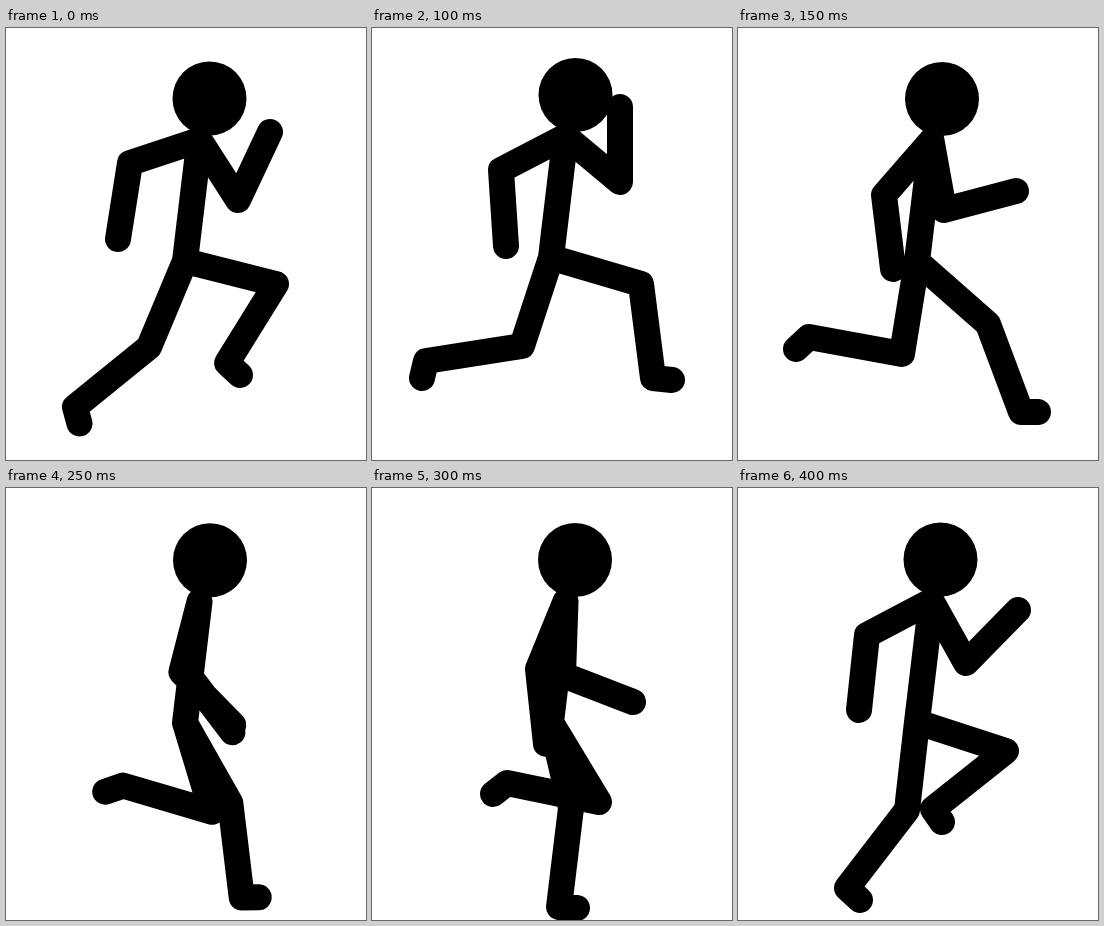
Recreate the animation shown at these times as an HTML page. Size 360x432 px, loop 0.45 s.

```html
<!DOCTYPE html>
<html lang="en">
<head>
<meta charset="utf-8">
<title>Running stick figure</title>
<style>
  html, body { margin: 0; width: 100%; height: 100%; overflow: hidden; background: #fff; }
  svg { display: block; width: 360px; height: 432px; }
  path { fill: none; stroke: #000; stroke-width: 26; stroke-linecap: round; stroke-linejoin: round; }
</style>
</head>
<body>
<svg viewBox="0 0 360 432">
  <circle id="head" r="37"/>
  <path id="body"/>
</svg>
<script>
const STEP = 50, COUNT = 9;

// Key poses by step: head centre, two arms (elbow, hand), two legs (knee, ankle, toe).
const keys = {
  0: { head: [203.5, 70.5],
    arms: [[124, 135, 112, 211], [232, 172, 264, 104]],
    legs: [[270, 256, 221, 335, 234, 347], [143, 319, 69, 379, 73.5, 395.5]] },
  2: { head: [203.5, 67],
    arms: [[129, 142, 134, 218], [248, 154, 248, 79]],
    legs: [[269, 256, 281, 350, 300, 352], [150, 318, 54, 333, 50, 350]] },
  3: { head: [204, 71],
    arms: [[146, 167, 155, 241], [206, 182, 278, 163]],
    legs: [[250, 296, 283, 384, 300, 384], [164, 326, 71, 309, 58, 321]] },
  4: { head: [205, 72.5],
    arms: [[173, 183, 180, 255], [185, 186, 257, 195]],
    legs: [[248, 302, 280, 387, 296, 386], [183, 328, 98, 295, 78, 295]] },
  6: { head: [203, 72],
    arms: [[191, 187, 261, 214], [166, 181, 174, 256]],
    legs: [[199, 320, 187, 419, 205, 420], [227, 314, 135, 295, 121, 306]] },
  8: { head: [202.5, 71.5],
    arms: [[228, 175, 280, 122], [129, 147, 121, 222]],
    legs: [[169, 322, 109, 400, 122, 412], [268, 263, 195, 321, 204, 334]] }
};

const mean = (a, b) => (a + b) / 2;
const shoulder = head => [193.5, head[1] + 41.5];
const hip = head => [179, head[1] + 162.5];

function toBones(root, limb) {
  let [x, y] = root;
  const bones = [];
  for (let i = 0; i < limb.length; i += 2) {
    const dx = limb[i] - x, dy = limb[i + 1] - y;
    bones.push({ angle: Math.atan2(dy, dx), length: Math.hypot(dx, dy) });
    x = limb[i];
    y = limb[i + 1];
  }
  return bones;
}

// Swings each bone halfway along the shorter arc.
function midLimb(rootA, limbA, rootB, limbB, root) {
  let [x, y] = root;
  const end = toBones(rootB, limbB);
  return toBones(rootA, limbA).flatMap((bone, i) => {
    const turn = end[i].angle - bone.angle;
    const angle = bone.angle + Math.atan2(Math.sin(turn), Math.cos(turn)) / 2;
    const length = mean(bone.length, end[i].length);
    x += length * Math.cos(angle);
    y += length * Math.sin(angle);
    return [x, y];
  });
}

function midPose(a, b) {
  const head = a.head.map((v, i) => mean(v, b.head[i]));
  const blend = (part, root) => a[part].map((limb, i) =>
    midLimb(root(a.head), limb, root(b.head), b[part][i], root(head)));
  return { head, arms: blend("arms", shoulder), legs: blend("legs", hip) };
}

const poses = Array.from({ length: COUNT }, (_, i) =>
  keys[i] || midPose(keys[i - 1], keys[i + 1]));

function outline({ head, arms, legs }) {
  const top = shoulder(head), base = hip(head);
  const line = (root, points) => "M" + [...root, ...points].map(v => v.toFixed(1)).join(" ");
  return line(top, base) +
    arms.map(limb => line(top, limb)).join("") +
    legs.map(limb => line(base, limb)).join("");
}

const headShape = document.getElementById("head");
const bodyShape = document.getElementById("body");
const start = performance.now();
let shown = -1;

function draw(now) {
  const step = Math.floor(Math.max(0, now - start) / STEP) % COUNT;
  if (step !== shown) {
    const pose = poses[step];
    headShape.setAttribute("cx", pose.head[0]);
    headShape.setAttribute("cy", pose.head[1]);
    bodyShape.setAttribute("d", outline(pose));
    shown = step;
  }
  requestAnimationFrame(draw);
}
draw(start);
</script>
</body>
</html>
```
